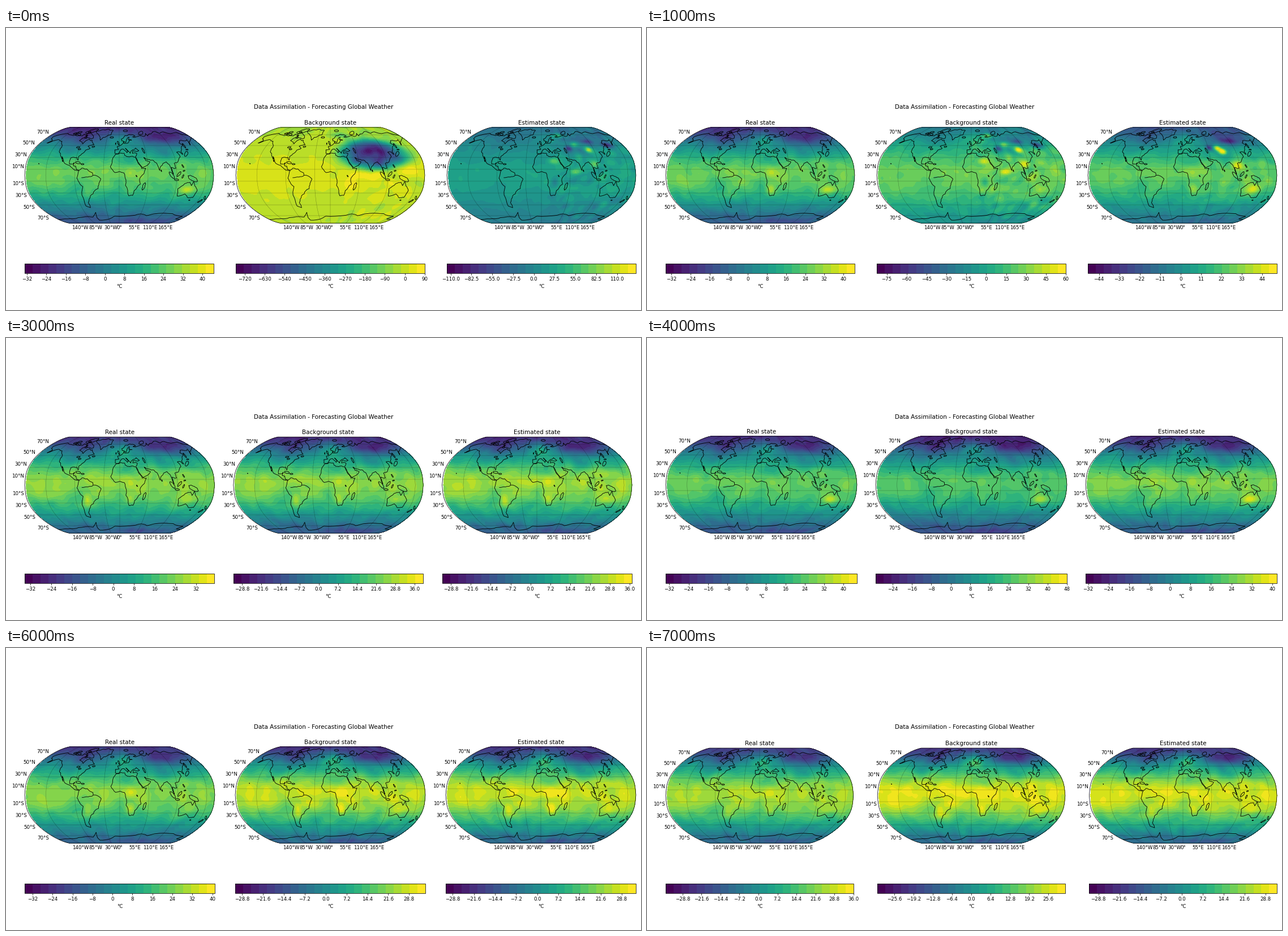
These frames come from a looping animation (1122 px wide and 499 px high, 8000 ms). A matplotlib script:

```python
import numpy as np
import matplotlib.pyplot as plt
from matplotlib.animation import FuncAnimation
from matplotlib.collections import LineCollection

W, H, DPI = 1122, 499, 72          # at 72 dpi one point is one pixel
BANDS = 24
LEFT, BOTTOM, BAR_TOP = 33, 345.3, 417.4
BIG, SMALL = 10.4, 8.67
plt.rcParams["font.family"] = "DejaVu Sans"

# Robinson projection: even samples from equator to pole, joined by polynomials
KNOTS = np.linspace(0, 1, 7)
ROB_X = np.polyfit(KNOTS, [1, .99, .96, .8962, .7986, .6732, .5322], 6)
ROB_Y = np.polyfit(KNOTS, [0, .186, .372, .5571, .7346, .8936, 1], 6)

AMERICA_EAST = [
    (-168, 66), (-156, 71), (-128, 70), (-96, 68), (-94, 71.5), (-82, 69), (-87, 64.5),
    (-94, 59), (-82, 53), (-77, 60), (-72, 62), (-68, 59), (-64.5, 60), (-56, 52), (-68, 49),
    (-62, 45.5), (-70, 42.5), (-76, 36), (-81, 31.5), (-80.5, 25.3), (-84, 30), (-96, 29),
    (-96, 18.7), (-91, 18.7), (-87, 21.4), (-88.5, 16), (-83.3, 15), (-82, 9.5), (-77, 8)]
AMERICA_WEST = [
    (-77, 8), (-83, 8.3), (-95, 16), (-105.5, 20), (-114, 31.6), (-110, 23), (-117, 32.5),
    (-124, 40), (-124, 47.5), (-134, 58), (-147, 60.8), (-164, 54.6), (-158, 58.6),
    (-165, 62), (-168, 66)]
SOUTH_AMERICA = [
    (-77, 8), (-72, 12), (-62, 10.6), (-51, 4), (-50, 0), (-35.2, -6), (-39, -13.5),
    (-41, -22.5), (-48, -26), (-58, -34.5), (-66, -46), (-65.5, -55), (-74, -52),
    (-73.5, -38), (-70.2, -19), (-76, -14), (-81, -5), (-77, 8)]
AFRICA = [
    (-6, 35.8), (10, 37), (11, 33.5), (20, 31), (32.5, 30.5), (37.5, 19), (43, 11.5),
    (51, 11.8), (40, -4), (40.6, -15), (35, -20), (27, -34), (19, -34.5), (12, -17),
    (13, -8), (9, 4), (-8, 4.4), (-17, 14.5), (-13, 27.7), (-6, 35.8)]
EUROPE = [
    (32.5, 31), (36, 36.5), (27, 37), (28, 41), (41, 41.5), (35, 46), (28.5, 43), (24, 40),
    (22.5, 37), (13, 45.5), (18, 40), (16, 38), (9, 44.3), (3, 43), (-2, 36.7), (-9, 37),
    (-9, 43), (-1.5, 43.5), (-4.5, 48.4), (8.5, 54), (10, 57), (11, 54), (20, 54.5),
    (23.5, 59.5), (29.5, 60), (22, 61), (25, 65.5), (17.5, 61), (14, 55.5), (6, 58.5),
    (5, 62), (15, 68.5), (27, 71), (41, 67), (34, 66), (54, 68.5)]
SIBERIA = [(54, 68.5), (68, 68.5), (72, 73), (74, 68), (81, 72), (104, 77.5), (113, 73.5),
           (140, 72.5), (180, 69)]
ASIA = [
    (180, 65), (170, 60), (162, 57), (157, 51), (162, 61), (142, 59), (136, 54.5), (141, 52),
    (131, 43), (127.5, 39.5), (128.5, 35), (125, 39.5), (118, 39), (121.5, 31), (114, 22.3),
    (106.5, 20), (109, 12), (100.5, 13.4), (103.5, 1.5), (97.5, 16.5), (91.5, 22.6), (80, 15),
    (77.5, 8), (72.8, 20), (67, 25), (56.5, 27), (48.5, 30), (52, 24.5), (59.8, 22.5),
    (45, 12.8), (32.5, 30)]
AUSTRALIA = [
    (142.5, -10.7), (146, -18), (153, -26), (150, -37.5), (141, -38), (131, -31.5),
    (117, -35), (114, -23), (126, -14), (136, -12), (139, -17.5), (142.5, -10.7)]
ANTARCTICA = [
    (-180, -78.5), (-150, -77), (-114, -74), (-72, -73), (-58, -63.5), (-62, -74), (-60, -80),
    (-28, -77), (-12, -71), (38, -69.5), (55, -66.5), (72, -70), (88, -66.5), (135, -66),
    (171, -71.5), (164, -77), (180, -78.5)]
GREENLAND = [(-45, 60), (-40, 65), (-22, 70), (-18, 80), (-35, 83.5), (-68, 78), (-54, 70),
             (-45, 60)]
AMAZON = [(-72, -4), (-60, -3), (-50, 0)]

# islands and lakes as long ovals between two end points
NORTHERN = [
    (-88, 72.5, -64, 64), (-117, 71, -102, 70), (-125, 72, -117, 74), (-90, 77, -64, 82),
    (-95, 75.5, -80, 75), (-117, 75.5, -106, 75.5), (-86, 65, -80, 63.5), (-23, 65, -14, 65),
    (52, 71, 68, 76.8), (12, 79, 25, 79), (-59, 48, -53, 48.5), (-4, 58, 0, 51),
    (-8, 55, -8, 52), (131, 32, 141, 40), (140, 43, 145, 43.5), (142, 46, 143, 54),
    (48.5, 46, 52, 37), (-92, 47, -85, 47.5), (-87, 44, -81, 44)]
SOUTHERN = [
    (45, -25, 50, -12.5), (110, -2, 118, 6), (95.5, 5.5, 105.5, -5.5), (105.5, -7, 114, -8),
    (120, -5, 123, 1), (131, -1, 150, -10), (121, 18, 124, 13), (122, 7, 126, 8),
    (145, -42, 148, -42), (173, -35, 177.5, -41), (173, -41, 167, -46), (-85, 22, -75, 20.3),
    (-74, 19, -68, 18.6), (-156, 20, -155, 19), (80, 9, 81, 6), (32, 0, 34, -2.5)]

MERIDIANS = [-140, -85, -30, 0, 55, 110, 165]
PARALLELS = [70, 50, 30, 10, -10, -30, -50, -70]
TITLES = ["Real state", "Background state", "Estimated state"]

# per step: map width, panel pitch, then (low, high, tick step) of each panel
SCENES = [
    (334, 373, (-32.9, 44.6, 8), (-760, 90, 90), (-115, 135, 27.5)),
    (334, 373, (-34.4, 44.7, 8), (-82.5, 60, 15), (-50, 52, 11)),
    (335.5, 368.8, (-34.2, 42, 8), (-33, 41, 8), (-33, 40, 8)),
    (335.5, 368.8, (-34.3, 39.2, 8), (-32, 39.2, 7.2), (-32, 36.8, 7.2)),
    (338, 371, (-33.5, 45.6, 8), (-31, 48, 8), (-33, 41.8, 8)),
    (336, 372, (-34.5, 43, 8), (-31.2, 40, 7.2), (-32, 38.4, 7.2)),
    (336, 372, (-35.2, 41, 8), (-31.2, 34.4, 7.2), (-31.2, 33.6, 7.2)),
    (331.7, 374.2, (-35.2, 36, 7.2), (-31.2, 31.2, 6.4), (-32, 32.8, 7.2)),
]

# daytime heating per step: Australia, southern Africa, South America, central Africa
HEAT = [(19, 6, 7, 2), (18, 14, 5, 8), (11, 11, 11, 6), (10, 8, 13, 3),
        (20, 4, 5, 2), (14, 8, 7, 4), (9, 12, 11, 7), (8, 7, 8, 4)]
HEAT_SPOTS = [(133, -25, 15, 7), (21, -24, 8, 8), (-64, -25, 7, 10), (25, 5, 18, 9)]

# bumps: lon, lat, lon size, lat size, amplitude
CLIMATE = [
    (115, 62, 45, 12, -14), (70, 62, 20, 7, -6), (-88, 62, 28, 11, -11), (5, 62, 32, 14, 14),
    (-150, 52, 25, 10, 4), (95, 36, 22, 7, -7), (5, 23, 20, 8, -6), (-85, -20, 24, 14, -5),
    (0, -18, 14, 14, -4), (70, -82, 65, 7, -6), (-105, 42, 12, 8, -5)]
SPOTS = [
    (99, 43, 7, 4.5, 105), (58, 45, 8, 5, -85), (145, 51, 14, 5, -85), (64, 6, 12, 4.5, 62),
    (24, 24, 11, 5, 55), (72, 52, 8, 4, 60), (42, 68, 16, 4, 68), (103, 19, 9, 5, 48),
    (26, -12, 7, 8, -36), (104, 57, 15, 4, -50), (76, 29, 7, 6, 36)]
STREAKS = [
    (74, 46, 7, 4, 46), (83, 40, 8, 4.5, 56), (57, 46, 7, 5, -44), (108, 58, 22, 6, -24),
    (107, 16, 10, 7, 25), (142, -20, 12, 7, 11)]
WARM_PATCHES = [(82, 42, 22, 6, -90), (42, -16, 11, 9, 65), (72, 0, 24, 6, 70),
                (153, 8, 13, 9, 75), (25, 69, 22, 6, -130)]

LON, LAT = np.meshgrid(np.arange(-177.5, 180.1, 2.5), np.arange(-90, 90.1, 2.5))


def bumps(rows):
    return sum(a * np.exp(-((LON - x) / sx) ** 2 - ((LAT - y) / sy) ** 2)
               for x, y, sx, sy, a in rows)


def noise(seed, passes=5):
    n = np.random.default_rng(seed).normal(size=LON.shape)
    for _ in range(passes):
        for axis in (1, 1, 0):
            n = (n + np.roll(n, 1, axis) + np.roll(n, -1, axis)) / 3
    return n / n.std()


def rough(points, rng, amount=.13):
    """Split every edge twice, pushing the new points sideways at random."""
    p = np.array(points, float)
    for _ in range(2):
        d = np.diff(p, axis=0)
        push = amount * rng.uniform(-1, 1, (len(d), 1))
        out = np.empty((2 * len(p) - 1, 2))
        out[::2] = p
        out[1::2] = p[:-1] + d / 2 + push * np.column_stack([-d[:, 1], d[:, 0]])
        p = out
    return p


def oval(x0, y0, x1, y1):
    t = np.linspace(0, 2 * np.pi, 9)
    dx, dy = (x1 - x0) / 2, (y1 - y0) / 2
    u, v = np.cos(t), .34 * np.sin(t)
    return np.column_stack([(x0 + x1) / 2 + u * dx - v * dy, (y0 + y1) / 2 + u * dy + v * dx])


def make_coasts():
    rng = np.random.default_rng(7)
    lands = [AMERICA_EAST, AMERICA_WEST, SOUTH_AMERICA, AFRICA, EUROPE, SIBERIA, ASIA,
             AUSTRALIA, GREENLAND, AMAZON]
    lands += [oval(*ends) for ends in NORTHERN + SOUTHERN]
    return [rough(p, rng) for p in lands] + [rough(ANTARCTICA, rng, .04)]


def zonal():
    c = np.cos(np.radians(LAT))
    return np.where(LAT > 0, -24 + 51 * c ** 1.6, -11 + 38 * c ** 2)


COASTS = make_coasts()
BASE = zonal() + bumps(CLIMATE) + 1.3 * noise(1)
EAST = 1 / (1 + np.exp(-(LON - 20) / 12))


def field(step, panel):
    heat = [spot + (a,) for spot, a in zip(HEAT_SPOTS, HEAT[step])]
    t = BASE + bumps(heat) + .8 * noise(10 + 3 * step + panel)
    if panel and step > 4:
        t += 1.5
    if step == 0 and panel == 1:
        r2 = ((LON - 88) / 66) ** 2 + ((LAT - 36) / 25) ** 2
        t += -660 * np.exp(-r2 ** 2) * (1 + .05 * noise(3)) + bumps(WARM_PATCHES)
        t += (4 + 16 * EAST) * noise(4)
    elif step == 0 and panel == 2:
        t += bumps(SPOTS) + (1 + 7 * EAST) * noise(5, 3)
    elif step == 1 and panel == 1:
        t += .6 * bumps(SPOTS) + (1 + 4 * EAST) * noise(5, 3)
    elif step == 1 and panel == 2:
        t += bumps(STREAKS) + (.5 + 2 * EAST) * noise(6, 3)
    elif step == 2 and panel:
        t += .25 / panel * bumps(STREAKS)
    return t


def project(lon, lat, box):
    x0, w = box
    h = w / 1.9716
    a = np.abs(lat) / 90
    x = x0 + w / 2 * (1 + np.asarray(lon) / 180 * np.polyval(ROB_X, a))
    y = BOTTOM - h / 2 * (1 + np.sign(lat) * np.polyval(ROB_Y, a))
    return x, y


def add_lines(paths, box, **style):
    segs = [np.column_stack(project(*np.array(p, float).T, box)) for p in paths]
    ax.add_collection(LineCollection(segs, **style), autolim=False)


def label(x, y, text, size=SMALL, ha="center"):
    ax.text(x, y, text, fontsize=size, ha=ha, va="baseline")


def draw_map(step, panel, box, low, high):
    x, y = project(LON, LAT, box)
    data = np.clip(field(step, panel), low, high)
    ax.contourf(x, y, data, levels=np.linspace(low, high, BANDS + 1), cmap="viridis")
    lats, lons = np.linspace(-90, 90, 73), np.linspace(-180, 180, 73)
    grid = [[(m, v) for v in lats] for m in MERIDIANS]
    grid += [[(v, p) for v in lons] for p in PARALLELS]
    add_lines(grid, box, color="black", lw=.45, alpha=.4)
    add_lines(COASTS, box, color="black", lw=.85)
    edge = [(-180, v) for v in lats] + [(180, v) for v in lats[::-1]] + [(-180, -90)]
    add_lines([edge], box, color="black", lw=.75)

    for p in PARALLELS:
        ex, ey = project(-180, p, box)
        label(ex - 2 - abs(p) / 35, ey + (-2.5 if p > 0 else 7.3),
              f"{abs(p)}°{'N' if p > 0 else 'S'}", ha="right")
    for m in MERIDIANS:
        side = "" if m == 0 else "E" if m > 0 else "W"
        label(project(m, -90, box)[0], 355.6, f"{abs(m)}°{side}")
    x0, w = box
    label(x0 + w / 2, BOTTOM - w / 1.9716 - 5, TITLES[panel], BIG)


def draw_bar(box, low, high, tick):
    x0, w = box
    base = BAR_TOP + w / 20
    ax.pcolormesh(np.linspace(x0, x0 + w, BANDS + 1), [BAR_TOP, base],
                  np.arange(BANDS)[None], cmap="viridis")
    ax.plot([x0, x0 + w, x0 + w, x0, x0], [BAR_TOP, BAR_TOP, base, base, BAR_TOP],
            color="black", lw=.75)
    digits = 0 if tick == int(tick) else 1
    for i in range(int(np.ceil(low / tick)), int(np.floor(high / tick + 1e-6)) + 1):
        x = x0 + (i * tick - low) / (high - low) * w
        ax.plot([x, x], [base, base + 3], color="black", lw=.7)
        label(x, base + 13.2, f"{i * tick:.{digits}f}".replace("-", "−"))
    label(x0 + w / 2, base + 26, "°C")


def draw(step):
    ax.clear()
    ax.set(xlim=(0, W), ylim=(H, 0))
    ax.axis("off")
    label(W / 2, 142.6, "Data Assimilation - Forecasting Global Weather", BIG)
    width, pitch, *scales = SCENES[step]
    for panel, (low, high, tick) in enumerate(scales):
        box = (LEFT + panel * pitch, width)
        draw_map(step, panel, box, low, high)
        draw_bar(box, low, high, tick)
    return []


fig = plt.figure(figsize=(W / DPI, H / DPI), dpi=DPI, facecolor="white")
ax = fig.add_axes([0, 0, 1, 1])
anim = FuncAnimation(fig, draw, frames=len(SCENES), init_func=lambda: [],
                     interval=1000, repeat=True, repeat_delay=0)
plt.show()
```
